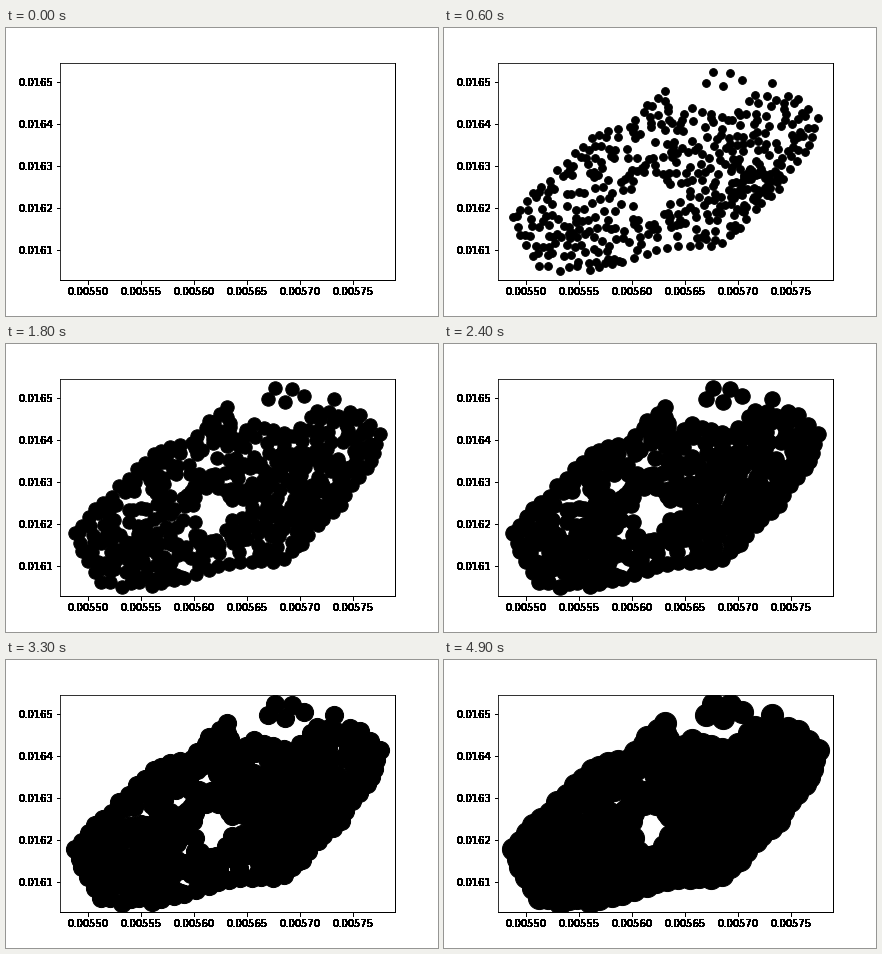
These frames come from a looping animation (432x288 px, 5 s). A matplotlib script:

```python
import matplotlib.pyplot as plt
import numpy as np
from matplotlib.animation import FuncAnimation
from matplotlib.path import Path

WIDTH, HEIGHT, DPI = 432, 288, 72
FRAMES, INTERVAL = 50, 100
LEFT, RIGHT, TOP, BOTTOM = 54, 388.8, 34.56, 252

plt.rcParams["font.family"] = "DejaVu Sans"
plt.rcParams["font.size"] = 10

# Key points of the cloud, in stage pixels with y downwards.
OUTLINE = np.array([
    (69.2, 189), (97, 159), (148, 110), (186, 99), (221, 63), (228, 95),
    (248, 80), (288, 92), (311, 67), (354, 71), (373.6, 90), (365, 117),
    (327, 168), (278, 215), (212, 222), (146, 242.1), (95, 238), (76, 207),
])
STRAYS = [(262, 55), (269, 44.4), (279, 58), (286, 45), (298, 52), (328, 55)]
HOLE, HOLE_RADIUS = (208, 166), 18
CORE, CORE_SPREAD = (307, 158), (14, 11)


def make_points(rng):
    points = list(STRAYS)
    shape = Path(OUTLINE)

    def scatter_inside(sample, count, spacing):
        goal = len(points) + count
        while len(points) < goal:
            p = sample()
            free = np.hypot(*(np.array(points) - p).T).min() > spacing
            in_hole = np.hypot(*(p - HOLE)) < HOLE_RADIUS
            if free and not in_hole and shape.contains_point(p):
                points.append(tuple(p))

    # Walk the outline, wobbling everything but its corners.
    for start, end in zip(OUTLINE, np.roll(OUTLINE, -1, axis=0)):
        steps = max(1, round(np.hypot(*(end - start)) / 11))
        points.append(tuple(start))
        for k in range(1, steps):
            p = start + (end - start) * k / steps
            points.append(tuple(p + rng.normal(0, 1.5, 2)))

    low, high = OUTLINE.min(axis=0), OUTLINE.max(axis=0)
    scatter_inside(lambda: rng.uniform(low, high), 330, 4)
    scatter_inside(lambda: rng.normal(CORE, CORE_SPREAD), 40, 2)
    return np.array(points)


def harden_labels():
    """Turn every faintly inked pixel outside the plot area solid black."""
    fig.canvas.draw()
    pixels = np.asarray(fig.canvas.buffer_rgba())
    inked = pixels[..., :3].min(axis=2) < 255
    inked[round(TOP):round(BOTTOM), round(LEFT):round(RIGHT)] = False
    overlay = np.zeros((HEIGHT, WIDTH, 4))
    overlay[..., 3] = inked
    fig.figimage(overlay, origin="upper", zorder=5)


fig = plt.figure(figsize=(WIDTH / DPI, HEIGHT / DPI), dpi=DPI,
                 facecolor="white")
ax = fig.add_axes([LEFT / WIDTH, 1 - BOTTOM / HEIGHT,
                   (RIGHT - LEFT) / WIDTH, (BOTTOM - TOP) / HEIGHT])
ax.set_xlim(LEFT, RIGHT)
ax.set_ylim(BOTTOM, TOP)
ax.set_xticks([82.1 + 53.05 * k for k in range(6)],
              [f"{0.0055 + 0.00005 * k:.5f}" for k in range(6)])
ax.set_yticks([222.2 - 41.95 * k for k in range(5)],
              [f"{0.0161 + 0.0001 * k:.4f}" for k in range(5)])
harden_labels()
dots = ax.scatter(*make_points(np.random.default_rng(7)).T,
                  color="black", linewidths=1)


def update(frame):
    dots.set_visible(frame > 0)
    dots.set_sizes([10 * frame])
    return (dots,)


anim = FuncAnimation(fig, update, frames=FRAMES, interval=INTERVAL,
                     repeat=True, repeat_delay=0)
plt.show()
```
